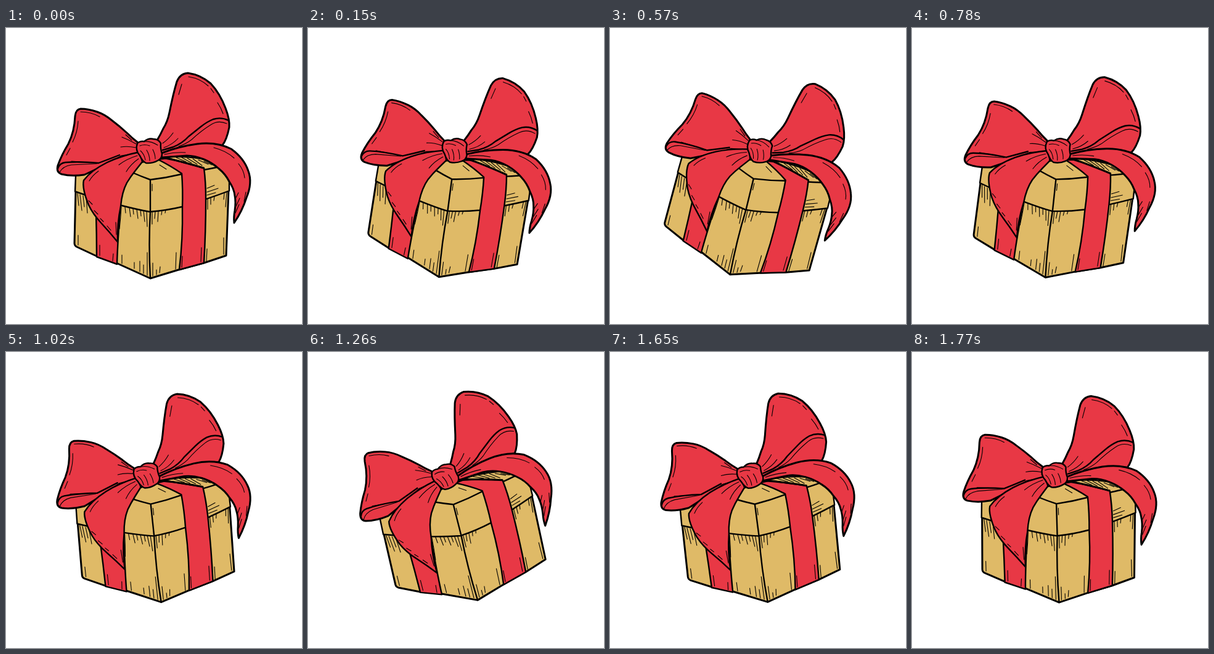
An HTML page for the animation above (1800 ms loop, 480 by 480 pixels).

```html
<!DOCTYPE html>
<html lang="en">
<head>
<meta charset="utf-8">
<title>Swinging gift</title>
<style>
  @property --step { syntax: "<number>"; inherits: false; initial-value: 0; }
  html, body { margin: 0; width: 100%; height: 100%; overflow: hidden; background: #fff; }
  svg { display: block; width: 100vw; height: 100vh; }
  /* 60 held poses of a sine swing, 6deg of phase each */
  #gift {
    transform-origin: 240px 240px;
    transform: rotate(calc(sin(var(--step) * 6deg) * 15deg));
    animation: swing 1.8s steps(60) infinite;
  }
  @keyframes swing { from { --step: 0; } to { --step: 60; } }
  path { stroke: #000; stroke-width: 2.4; stroke-linecap: round; stroke-linejoin: round; fill: none; }
  .gold { fill: #dfba67; }
  .red { fill: #e83845; }
  .ink { stroke-width: 1.1; }
  .bold { stroke-width: 3; }
</style>
</head>
<body>
<svg viewBox="0 0 480 480">
  <g id="gift">
    <!-- box -->
    <path class="gold bold" d="M113 262L111 349Q111 353 115 355L147 370L181 382L234 406L280 392L321 381L357 369Q358 340 361 262L233 296Z"/>
    <path class="red" d="M146 298Q147 335 147 371L180 383Q181 345 186 284L160 278Z"/>
    <path class="gold" d="M113 239L112 265Q145 277 184 287Q215 295 233 298Q260 296 285 290Q325 278 362 264L362 238L335 216Q300 207 262 209L200 222Z"/>
    <path d="M204 234Q220 241 234 246Q260 243 285 237M321 230Q338 227 350 224M234 246L234 298Q231 350 234 406"/>

    <!-- ribbon over the front -->
    <path class="red" d="M246 213Q268 224 285 236Q287 262 286 291Q287 343 281 392L321 381Q324 330 324 277Q324 250 321 227Q290 219 263 211Z"/>
    <path class="bold" d="M258 211Q289 217 320 227"/>
    <path class="ink" d="M276 210L292 217M285 210L301 219M294 211L310 221M303 212L318 223M312 214L328 221M321 216L334 222M249 222L260 229"/>

    <!-- box hatching -->
    <path class="ink" d="M116 268L118 288M120 270L123 296M125 272L127 290M130 274L132 300M137 276L138 285
      M193 290L194 300M200 291L202 306M206 293L207 302M212 294L214 309M218 295L219 305M223 296L225 314M228 297L229 322
      M237 298L237 318M242 298L241 309M247 297L246 314M253 296L252 303M259 295L258 300"/>
    <path class="ink" d="M327 277L327 294M332 275L332 286M338 273L337 280M354 268L353 278M358 266L356 290
      M326 260L338 255M326 266L344 260M326 271L340 267M237 253L237 264"/>
    <path class="ink" d="M117 336L117 352M188 368L188 382M208 380L208 390M217 378L217 395M223 384L223 398M229 364L229 401
      M238 381L238 402M244 392L244 400M250 387L249 397M276 364L275 391M326 358L325 378M353 340L353 367"/>
    <path class="ink" d="M152 352L152 369M174 366L173 378M286 370L285 388M317 356L316 379"/>

    <!-- left loop -->
    <path class="red bold" d="M213 185Q204 178 196 170Q184 159 172 150Q160 140 148 136Q133 131 121 131Q113 132 112 143Q111 168 101 188Q90 206 84 223Q81 234 90 237Q106 241 127 238Q162 222 187 208L217 203Z"/>
    <path d="M84 228Q87 219 96 218Q118 216 150 219Q166 213 184 206"/>
    <path class="ink" d="M87 234Q92 224 106 222Q126 221 147 220M106 216L134 218M121 136Q138 136 152 144M117 151Q116 169 108 185M104 195L98 206"/>
    <path class="ink" d="M211 188Q199 181 188 177M211 194Q197 191 186 193M204 182L194 173"/>

    <!-- right loop -->
    <path class="red bold" d="M245 182Q251 172 255 163Q262 152 265 137Q271 107 277 87Q282 74 295 73Q316 76 332 90Q347 106 356 130Q363 148 362 161Q358 181 351 190L300 191L252 205Z"/>
    <path d="M361 150Q349 144 336 148Q326 152 316 160L296 176Q286 187 271 193L254 198"/>
    <path class="ink" d="M358 155Q344 149 332 157Q316 167 301 181Q292 188 280 192M296 79Q315 82 328 94M332 98L337 105M285 91L280 108M343 121Q349 130 352 139
      M254 187Q264 180 271 170M256 194Q270 189 279 179"/>

    <!-- right tail -->
    <path class="red bold" d="M252 203Q280 192 310 188Q341 184 365 196Q386 211 393 232Q400 251 390 275Q383 297 370 316Q369 307 371 296Q373 282 371 272Q370 261 362 249Q356 237 345 228Q335 219 321 213Q306 207 293 207L252 210Z"/>
    <path class="ink" d="M257 205Q274 201 291 202M337 194Q357 199 370 211M377 220Q386 231 387 243M372 300L378 286M373 289L379 276M372 277L377 267M386 281L389 266"/>

    <!-- left tail -->
    <path class="red" d="M217 201Q187 207 164 218Q138 231 126 247Q123 260 134 287Q141 302 155 317Q168 331 181 347Q180 318 186 289Q188 266 196 251Q202 241 210 231L221 217Z"/>
    <path class="ink" d="M213 207Q196 212 183 222M215 212Q202 221 195 233M150 232Q140 239 135 248
      M134 280L140 286M143 296L149 302M153 309L158 314M164 321L170 328M178 315L179 335M187 290Q186 308 184 326"/>

    <!-- knot -->
    <path class="red" d="M213 187Q217 183 224 184Q231 178 239 180Q247 180 251 187Q250 195 253 204Q253 212 246 215Q237 220 227 219Q221 216 217 207Q209 198 213 187Z"/>
    <path class="ink" d="M224 184Q235 183 246 190M217 191Q225 188 233 191M218 199Q224 204 226 214M228 198Q233 206 233 215M238 197Q242 205 242 212"/>
  </g>
</svg>
</body>
</html>
```
